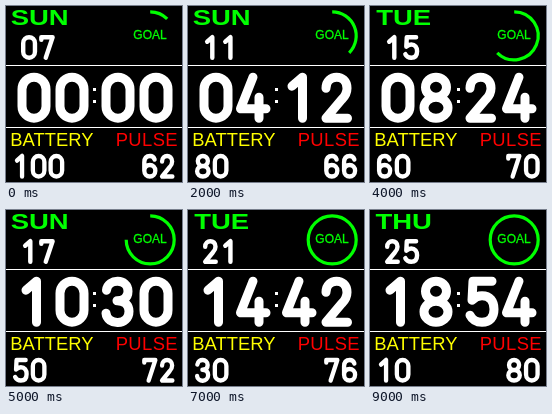
An HTML page that plays this animation: 176 by 176 pixels, repeating every 10000 ms.

```html
<!DOCTYPE html>
<html lang="en">
<head>
<meta charset="utf-8">
<title>Watch face</title>
<style>
  html, body { margin: 0; width: 100%; height: 100%; overflow: hidden; background: #000; }
  svg { display: block; width: 100vw; height: 100vh; }
  text { font-family: "Liberation Sans", Arial, sans-serif; }
  .label { font-size: 18.4px; }
  .digits { fill: none; stroke: #fff; stroke-width: 9; stroke-linecap: round; stroke-linejoin: round; }
</style>
</head>
<body>
<svg viewBox="0 0 176 176">
  <rect width="176" height="176"/>
  <path d="M0 59.5H176M0 121.5H176" stroke="#fff"/>
  <path d="M87 82h3v3h-3zM87 94h3v3h-3z" fill="#fff"/>

  <g fill="#0f0" text-anchor="middle">
    <text id="weekday" transform="translate(33.7 19.3) scale(1.25 1)" font-size="22" font-weight="bold"></text>
    <text x="144" y="33.3" font-size="12" stroke="#0f0" stroke-width=".3">GOAL</text>
  </g>
  <path id="goal" fill="none" stroke="#0f0" stroke-width="3.2"/>

  <text class="label" x="4.3" y="140" fill="#ff0">BATTERY</text>
  <text class="label" x="172" y="140" fill="#f00" text-anchor="end" letter-spacing=".4">PULSE</text>

  <g class="digits">
    <g id="date" transform="translate(17.2 31.2) scale(.49 .5)"></g>
    <g id="hours" transform="translate(16 71.2)"></g>
    <g id="minutes" transform="translate(100 71.2)"></g>
    <g id="battery" transform="translate(9.1 150) scale(.48 .5)"></g>
    <g id="pulse" transform="translate(138.3 150) scale(.48 .5)"></g>
  </g>
</svg>
<script>
const STEP_MS = 1000;
const STEPS = 10;
const WEEKDAYS = ["SUN", "MON", "TUE", "WED", "THU", "FRI", "SAT"];

// Centre lines of the digits in a 24 x 41 box.
const GLYPHS = [
  "M0 12a12 12 0 0 1 24 0V29a12 12 0 0 1-24 0Z",
  "M4 9L14.5 0V41",
  "M0 11C0-3.5 21-4 21 11C21 16 19 19 16 22L0 41H21.5",
  "M0.5 9C2-3 22-3 22 10C22 17 17 19.5 11 19.5C19 19.5 23 24 23 30C23 45 1 44.5 0 32",
  "M11 0L-1.5 31.5H24M17 20V41",
  "M22 0H3L2 19C6 15 10 14.5 12 14.5C20 14.5 24 20 24 28C24 36 20 41 12 41C6 41 2 38 0 34",
  "M21.5 7C20 2.5 16 0 12 0C4 0 0 5 0 13V29.5a11.5 11.5 0 1 0 23 0a11.5 11.5 0 1 0-23 0",
  "M0 5V0H23L9 41",
  "M1.5 10a10.5 10 0 1 0 21 0a10.5 10 0 1 0-21 0M0 30.5a12 10.5 0 1 0 24 0a12 10.5 0 1 0-24 0",
  "M1.5 34C3 38.5 7 41 11 41C19 41 23 36 23 28V11.5a11.5 11.5 0 1 0-23 0a11.5 11.5 0 1 0 23 0"
];

const byId = id => document.getElementById(id);

function showNumber(id, value, advance = 37) {
  byId(id).innerHTML = [...String(value).padStart(2, "0")]
    .map((digit, i) => `<path transform="translate(${i * advance})" d="${GLYPHS[digit]}"/>`)
    .join("");
}

function goalPath(eighths) {
  const cx = 144.2, cy = 29.8, r = 24;
  if (eighths >= 8) return `M${cx} ${cy - r}a${r} ${r} 0 0 1 0 ${2 * r}a${r} ${r} 0 0 1 0 ${-2 * r}Z`;
  const angle = eighths * Math.PI / 4;
  const x = cx + r * Math.sin(angle), y = cy - r * Math.cos(angle);
  return `M${cx} ${cy - r}A${r} ${r} 0 ${eighths > 4 ? 1 : 0} 1 ${x} ${y}`;
}

// Each step moves on one month and two days.
function show(step) {
  const day = 7 + 2 * step;
  byId("weekday").textContent = WEEKDAYS[new Date(2018, step, day).getDay()];
  byId("goal").setAttribute("d", goalPath(step + 1));
  showNumber("date", day);
  showNumber("hours", 2 * step, 38);
  showNumber("minutes", 6 * step, 38);
  showNumber("battery", 100 - 10 * step);
  showNumber("pulse", 62 + 2 * step);
}

let shown = 0;
const start = performance.now();

function tick() {
  const step = Math.floor((performance.now() - start) / STEP_MS) % STEPS;
  if (step !== shown) show(shown = step);
  requestAnimationFrame(tick);
}

show(shown);
tick();
</script>
</body>
</html>
```
